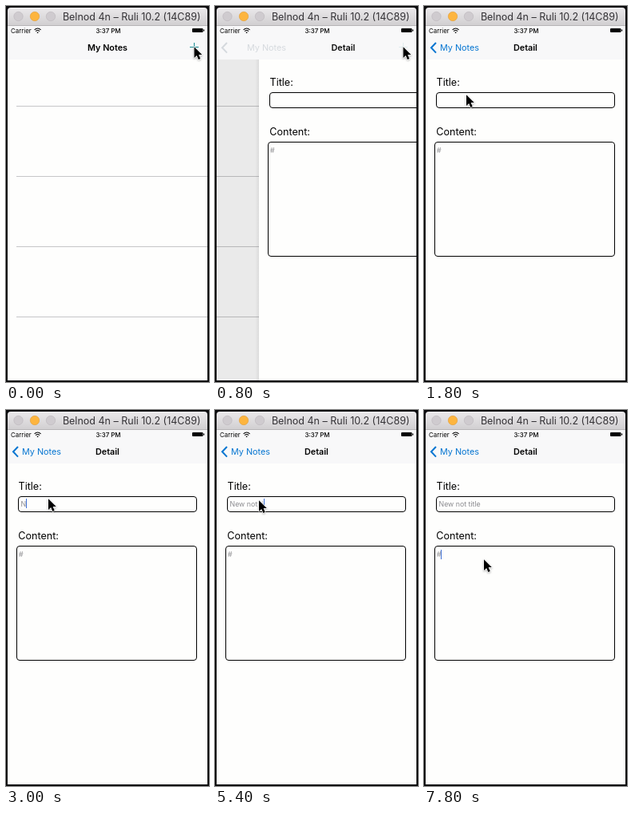
Animation, 254 px wide and 471 px high, one loop 8 s. Source, as an HTML page:

```html
<!DOCTYPE html>
<html lang="en">
<head>
<meta charset="utf-8">
<title>My Notes</title>
<style>
html, body { margin: 0; width: 100%; height: 100%; overflow: hidden; background: #0c0c0e; }
svg { display: block; }
text { font-family: Inter, Roboto, sans-serif; fill: #000; white-space: pre; }
.mid { text-anchor: middle; }
.status { font-size: 7.9px; }
.nav { font-size: 10.8px; }
.bold { font-weight: 600; }
.label { font-size: 12.6px; }
.input { font-size: 8.8px; fill: #8c8c90; }
.box { fill: #fefefd; stroke: #000; }
.caret { fill: #3f70d4; }
#back text { fill: currentColor; }
#cursor { filter: drop-shadow(0 1px 1px rgba(0, 0, 0, .3)); }
</style>
</head>
<body>
<svg width="254" height="471" viewBox="0 0 254 471">
  <defs>
    <linearGradient id="chrome" x2="0" y2="1">
      <stop stop-color="#ebe9eb"/><stop offset="1" stop-color="#d0ced0"/>
    </linearGradient>
    <linearGradient id="edge">
      <stop stop-color="#000" stop-opacity="0"/><stop offset="1" stop-color="#000" stop-opacity=".06"/>
    </linearGradient>
    <clipPath id="screen"><rect x="2" y="25" width="250" height="444"/></clipPath>
  </defs>

  <path d="M2 25V6q0-4 4-4h242q4 0 4 4v19z" fill="url(#chrome)"/>
  <rect x="2" y="24" width="250" height="1" fill="#b6b4b6"/>
  <g fill="#cfcbcf" stroke="#bab6ba" stroke-width=".6">
    <circle cx="15.5" cy="13" r="5.7"/>
    <circle cx="36" cy="13" r="5.7" fill="#fdb53f" stroke="#e09d35"/>
    <circle cx="56" cy="13" r="5.7"/>
  </g>
  <text class="mid" x="157.2" y="18" font-size="12.5" style="fill:#343236">Belnod 4n – Ruli 10.2 (14C89)</text>

  <g clip-path="url(#screen)">
    <rect x="2" y="25" width="250" height="444" fill="#fefefd"/>
    <g id="list" fill="#c6c6c8">
      <rect x="13" y="125" width="239" height="1"/>
      <rect x="13" y="213" width="239" height="1"/>
      <rect x="13" y="301" width="239" height="1"/>
      <rect x="13" y="389" width="239" height="1"/>
    </g>
    <rect id="dim" x="2" y="67" width="250" height="402" fill="#0c0c18"/>

    <g id="detail">
      <rect x="-3" y="67" width="5" height="402" fill="url(#edge)"/>
      <rect x="2" y="67" width="250" height="402" fill="#fefefd"/>
      <text class="label" x="15.5" y="100">Title:</text>
      <rect class="box" x="15.5" y="108.5" width="223" height="19" rx="3.5"/>
      <text class="input" id="typed" x="18.5" y="121"></text>
      <rect class="caret" id="caret" y="111" width="1" height="12"/>
      <text class="label" x="15.2" y="162">Content:</text>
      <rect class="box" x="13.5" y="170.5" width="225" height="143" rx="3.5"/>
      <text class="input" x="16" y="184">#</text>
      <rect class="caret" id="caret2" x="21" y="175" width="1" height="12"/>
    </g>

    <rect x="2" y="25" width="250" height="42" fill="#f8f8f9"/>
    <text class="status" x="6" y="34">Carrier</text>
    <g fill="none" stroke="#000" stroke-width="1.1">
      <path d="M35.6 29.8q4-3.6 8 0M37.1 31.6q2.5-2.2 5 0"/>
      <path d="M39.6 34.2l-1.2-1.3q1.2-.9 2.4 0z" fill="#000" stroke="none"/>
    </g>
    <text class="status mid" x="128" y="34" font-weight="500">3:37 PM</text>
    <rect x="233" y="28" width="13.5" height="5" rx="1"/>
    <rect x="247" y="29.5" width="1.2" height="2"/>

    <text class="nav bold mid" id="home" x="127" y="56">My Notes</text>
    <path id="plus" d="M230 51.5h11M235.5 46v11" stroke="#1b8d96"/>
    <g id="back">
      <path d="M15 46l-6 6.3 6 6.3" fill="none" stroke="currentColor" stroke-width="2"/>
      <text class="nav" id="backText" x="20" y="56">My Notes</text>
    </g>
    <text class="nav bold mid" id="heading" x="127" y="56">Detail</text>
  </g>

  <g id="cursor">
    <path d="M0 1.3v13.6l3.2-3 2.1 5.2 2.5-1-2.2-5h4.2z" fill="#000" stroke="#fff" stroke-width="1.4" paint-order="stroke" stroke-linejoin="round"/>
  </g>
</svg>
<script>
const LOOP = 8000, TICK = 200;
const $ = id => document.getElementById(id);
const clamp = v => Math.max(0, Math.min(1, v));
const move = (id, x, y = 0) => $(id).setAttribute('transform', `translate(${x.toFixed(2)} ${y.toFixed(2)})`);
const fade = (id, a) => $(id).setAttribute('opacity', clamp(a));

const title = 'New not title';
const keyTimes = [3000, 3600, 3800, 4000, 4200, 4400, 4600, 4800, 5200, 5400, 5600, 5800, 6000];

// time, x, y of the pointer tip
const path = [
  [0, 235.5, 50], [1200, 235.5, 50], [1400, 205, 63], [1600, 125, 95], [1800, 53, 110],
  [3400, 53, 110], [3600, 55, 112], [6400, 55, 112], [6600, 142, 111], [6800, 184, 126],
  [7000, 194, 152], [7200, 165, 179], [7400, 112, 188], [7600, 80, 187], [7800, 75, 186]
];

function pointer(t) {
  const i = path.findIndex(k => k[0] > t);
  if (i < 0) return path[path.length - 1].slice(1);
  const [a, b] = [path[i - 1], path[i]];
  const f = (t - a[0]) / (b[0] - a[0]);
  return [a[1] + (b[1] - a[1]) * f, a[2] + (b[2] - a[2]) * f];
}

// remaining share of the push, a critically damped spring
function remaining(t) {
  const u = Math.max(0, t - 636) * 0.018;
  return (1 + u) * Math.exp(-u);
}

function draw(t) {
  const p = remaining(t), done = 1 - p;
  move('detail', Math.round(256 * p));
  move('list', -75 * done);
  fade('dim', 0.1 * done);
  fade('home', 1 - 4 * done);
  fade('plus', t < 600 ? 1 : Math.min(0.25, p / 2));
  fade('back', 1 - 3.8 * p);
  $('back').style.color = `hsl(207, ${95 * clamp(1 - 4 * p)}%, 42%)`;
  move('backText', 97 * p);
  fade('heading', p < 1 ? 1 - p * p : 0);
  move('heading', 162 * p);

  const typed = $('typed');
  typed.textContent = title.slice(0, keyTimes.filter(k => k <= t).length);
  $('caret').setAttribute('x', Math.round(18.5 + typed.getComputedTextLength()));
  fade('caret', t >= 2600 && t < 7800 && !(t >= 6600 && t < 7000) ? 1 : 0);
  fade('caret2', t >= 7800 ? 1 : 0);
  move('cursor', ...pointer(t));
}

const start = performance.now();
function frame() {
  const t = (performance.now() - start) % LOOP;
  draw(Math.floor(t / TICK) * TICK);
  requestAnimationFrame(frame);
}
frame();
</script>
</body>
</html>
```
